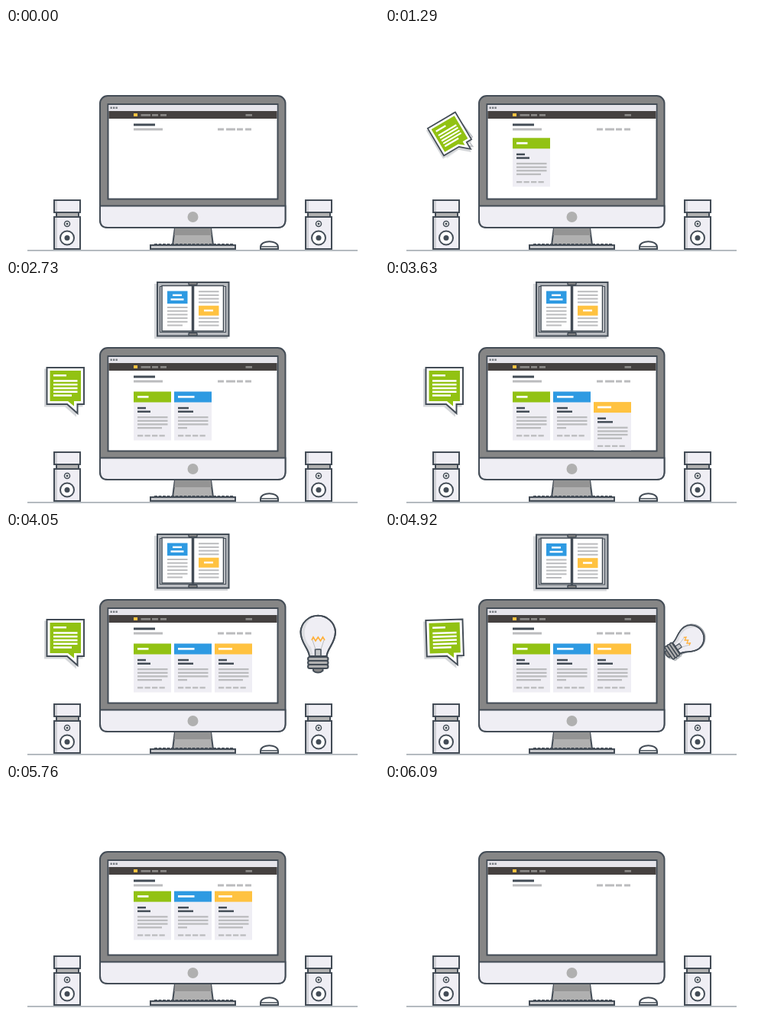
An HTML page with a canvas that plays this animation: 488 px wide and 294 px high, repeating every 6.3 s.

```html
<!DOCTYPE html>
<html lang="en">
<head>
<meta charset="utf-8">
<style>
html, body { margin: 0; width: 100%; height: 100%; overflow: hidden; background: #fff; }
canvas { display: block; }
</style>
</head>
<body>
<canvas id="stage" width="488" height="294"></canvas>
<script>
const ctx = document.getElementById('stage').getContext('2d');
const LOOP = 6300;
const INK = '#434c56', PALE = '#efeef4', GREY = '#bbbcbe', SHADE = '#d5d7da';
const GREEN = '#92c213', BLUE = '#2e9ae2', YELLOW = '#ffc240';

// drawing helpers
function rect(x, y, w, h, fill) {
  ctx.fillStyle = fill;
  ctx.fillRect(x, y, w, h);
}
function paint(path, fill, width = 2, stroke = INK) {
  if (fill) { ctx.fillStyle = fill; ctx.fill(path); }
  if (width) { ctx.lineWidth = width; ctx.strokeStyle = stroke; ctx.stroke(path); }
}
function box(x, y, w, h, fill, r = 0, width = 2) {
  const p = new Path2D();
  p.roundRect(x, y, w, h, r);
  paint(p, fill, width);
}
function disc(x, y, r, fill, width = 0) {
  const p = new Path2D();
  p.arc(x, y, r, 0, 7);
  paint(p, fill, width);
}
const shape = (d, fill, width, stroke) => paint(new Path2D(d), fill, width, stroke);
const lines = (x, w, h, fill, ...ys) => ys.forEach(y => rect(x, y, w, h, fill));

// timing helpers
const span = (t, start, length) => Math.min(1, Math.max(0, (t - start) / length));
const sineOut = u => Math.sin(u * Math.PI / 2);
const expoIn = u => u > 0 ? 2 ** (10 * (u - 1)) : 0;
const backIn = u => u * u * (2.3 * u - 1.3);

function speaker(x) {
  ctx.save();
  ctx.translate(x, 0);
  box(4, 242, 29, 6, '#b0b0b0');
  for (const [y, h] of [[226, 16], [248, 42]]) {
    box(1, y, 34, h, PALE);
    rect(2, y + 1, 3, h - 2, '#d0d1d6');
    box(1, y, 34, h, null);
  }
  disc(18, 257, 3.5, '#fff', 1.5);
  disc(18, 257, 1.5, INK);
  disc(18, 275.5, 9, '#fff', 2);
  disc(18, 275.5, 3.5, INK);
  ctx.restore();
}

function desk() {
  rect(28, 291, 432, 2, '#b4babf');
  speaker(62);
  speaker(391);
  shape('M221 262L218 285H271L268 262Z', '#b0b0b0');
  shape('M221 263L220 272H269L268 263Z', '#949494', 0);
  ctx.setLineDash([4, 1.5]);
  shape('M194 284H298', null, 2);
  ctx.setLineDash([]);
  box(189, 285, 111, 5, '#c9cacd');
  shape('M333 290V287C334 278 355 278 356 287V290Z', '#fff');
  shape('M333 287H356', null, 1.5);
}

function monitor() {
  box(123, 89, 242.5, 173, '#868686', 10);
  shape('M123 233.5H365.5V252Q365.5 262 355.5 262H133Q123 262 123 252Z', PALE);
  disc(244.5, 248, 7, '#b0b0b0');
  box(133.5, 100, 222, 124.5, '#fff');
  rect(134.5, 101, 220, 8, '#e6e5eb');
  for (const x of [136.5, 140, 143.5]) rect(x, 103.5, 2.3, 2.5, '#73787e');
  rect(134.5, 109, 220, 10, '#454140');
  rect(167, 112, 5, 4, YELLOW);
  for (const [x, w] of [[176.5, 12.5], [191, 8], [202, 8], [313.5, 8.5]]) rect(x, 113, w, 2.7, '#8a8886');
  rect(167, 125.5, 28, 3, INK);
  rect(167, 131.5, 38, 3, GREY);
  for (const [x, w] of [[277, 8], [288, 12], [302, 8], [313, 8]]) rect(x, 131.5, w, 3, GREY);
}

const cards = [
  { x: 167, color: GREEN, start: 960, head: 14.5, top: 11, next: 17, last: 32 },
  { x: 220, color: BLUE, start: 2250, head: 21.5, top: 14, next: 20, last: 12 },
  { x: 273, color: YELLOW, start: 3510, head: 18, top: 11, next: 20, last: 32 }
];

function drawCards(t) {
  ctx.save();
  ctx.beginPath();
  ctx.rect(135, 119, 220, 104.5);
  ctx.clip();
  for (const c of cards) {
    const drop = 100 * (backIn(1 - span(t, c.start, 390)) + backIn(span(t, 5520, 570)));
    ctx.save();
    ctx.translate(c.x, 146.5 + drop);
    rect(0, 0, 49, 64, PALE);
    rect(0, 0, 49, 14, c.color);
    rect(5, 5.5, c.head, 2.7, '#fff');
    rect(5, 20.3, c.top, 2.5, INK);
    rect(5, 25, c.next, 2.5, INK);
    lines(5, 39.5, 2.3, GREY, 32.5, 37.2, 41.8);
    rect(5, 46.5, c.last, 2.3, GREY);
    for (const x of [5, 14.5, 24, 33.5]) rect(x, 56.7, 7.3, 2.3, GREY);
    ctx.restore();
  }
  ctx.restore();
}

function chat() {
  const bubble = 'M53.5 115H102V163H93.5V175L80 163H53.5Z';
  ctx.save();
  ctx.translate(-2.5, 2.5);
  shape(bubble, SHADE, 2, SHADE);
  ctx.restore();
  shape(bubble, '#fff');
  shape('M57.5 119H98V159H89V165.5L81 159H57.5Z', GREEN, 0);
  rect(62, 124, 17, 2.5, '#fff');
  lines(62, 31.5, 2.5, '#fff', 131.2, 136, 140.8, 145.5);
  rect(62, 150.3, 24, 2.5, '#fff');
}

function book() {
  rect(194, 5, 96, 72, SHADE);
  box(198, 3, 93.5, 70.5, '#b9bcc0');
  box(201.5, 8.5, 86, 60, '#d9dadd', 0, 1.2);
  box(204, 7.5, 39.5, 59.5, '#fff', 0, 1.5);
  box(245.5, 7.5, 39, 59.5, '#fff', 0, 1.5);
  rect(243, 6, 3, 64, INK);
  for (const y of [3, 69.5]) box(239, y, 11, 3.5, '#868686', 1, 1.5);
  rect(211, 14.5, 26.5, 16.5, BLUE);
  rect(218, 18.7, 12, 2.4, '#fff');
  rect(215.5, 24.3, 17, 2.4, '#fff');
  lines(211, 26.5, 2, GREY, 35, 39.7, 44.4, 49.1, 53.8);
  rect(211, 58.5, 20, 2, GREY);
  lines(252, 26.5, 2, GREY, 14.2, 18.9, 23.6, 28.3, 49.2, 53.9, 58.6);
  rect(252, 33.7, 26.5, 13, YELLOW);
  rect(259, 38.8, 12, 2.5, '#fff');
}

function bulb() {
  const glass = 'M397 163C396 152 385.5 146 385.5 131A22.8 22.8 0 0 1 431 131C431 146 420.5 152 419.5 163Z';
  shape(glass, PALE);
  shape('M397 162C396 152 386.5 146 386.5 131A22 22 0 0 1 406 109C386 118 388 142 399 151L402 162Z', '#dcdde1', 0);
  shape('M404.5 163V154H412V163Z', '#c4c6c9', 1.5);
  shape('M400 142L402 138L405 143L408.3 138L411.5 143L414.5 138L417 142', null, 1.7, '#ffb03a');
  shape('M401 142L405 154M416 142L412 154', null, 1, GREY);
  shape(glass, null);
  shape('M402 178H414.5V182Q412 184.5 408.3 184.5Q404 184.5 402 182Z', '#868686');
  for (const y of [164, 169, 174]) box(395, y, 26.5, 5, '#b0b0b0', 2.5);
}

// Spins a side icon out of the monitor; p = 1 is fully hidden.
function spin(draw, cx, cy, side, p, alpha = 1) {
  const scale = 1 - 1.6 * p;
  if (scale <= 0) return;
  ctx.save();
  ctx.globalAlpha = alpha;
  ctx.translate(cx + side * 100 * p, cy);
  ctx.rotate(-side * 2 * Math.PI * p);
  ctx.scale(scale, scale);
  ctx.translate(-cx, -cy);
  draw();
  ctx.restore();
}

function hidden(t, inStart, inLength, outStart) {
  return 1 - sineOut(span(t, inStart, inLength)) + expoIn(span(t, outStart, 5220 - outStart));
}

function drawIcons(t) {
  const chatAt = s => hidden(s, 960, 450, 4830);
  const bulbAt = s => hidden(s, 3510, 540, 4110);
  for (const [draw, x, y, side, at] of [[chat, 76, 142, 1, chatAt], [bulb, 408, 144.5, -1, bulbAt]]) {
    const p = at(t), trail = at(t - 12);
    if (Math.abs(trail - p) > 0.005) spin(draw, x, y, side, trail, 0.35);
    spin(draw, x, y, side, p);
  }
  ctx.save();
  ctx.translate(0, 100 * hidden(t, 2250, 480, 4830));
  book();
  ctx.restore();
}

function frame(now) {
  const t = now % LOOP;
  rect(0, 0, 488, 294, '#fff');
  drawIcons(t);
  desk();
  monitor();
  drawCards(t);
  requestAnimationFrame(frame);
}
const begin = performance.now();
requestAnimationFrame(function tick() {
  frame(0);
});
frame = (draw => () => draw(performance.now() - begin))(frame);
</script>
</body>
</html>
```
